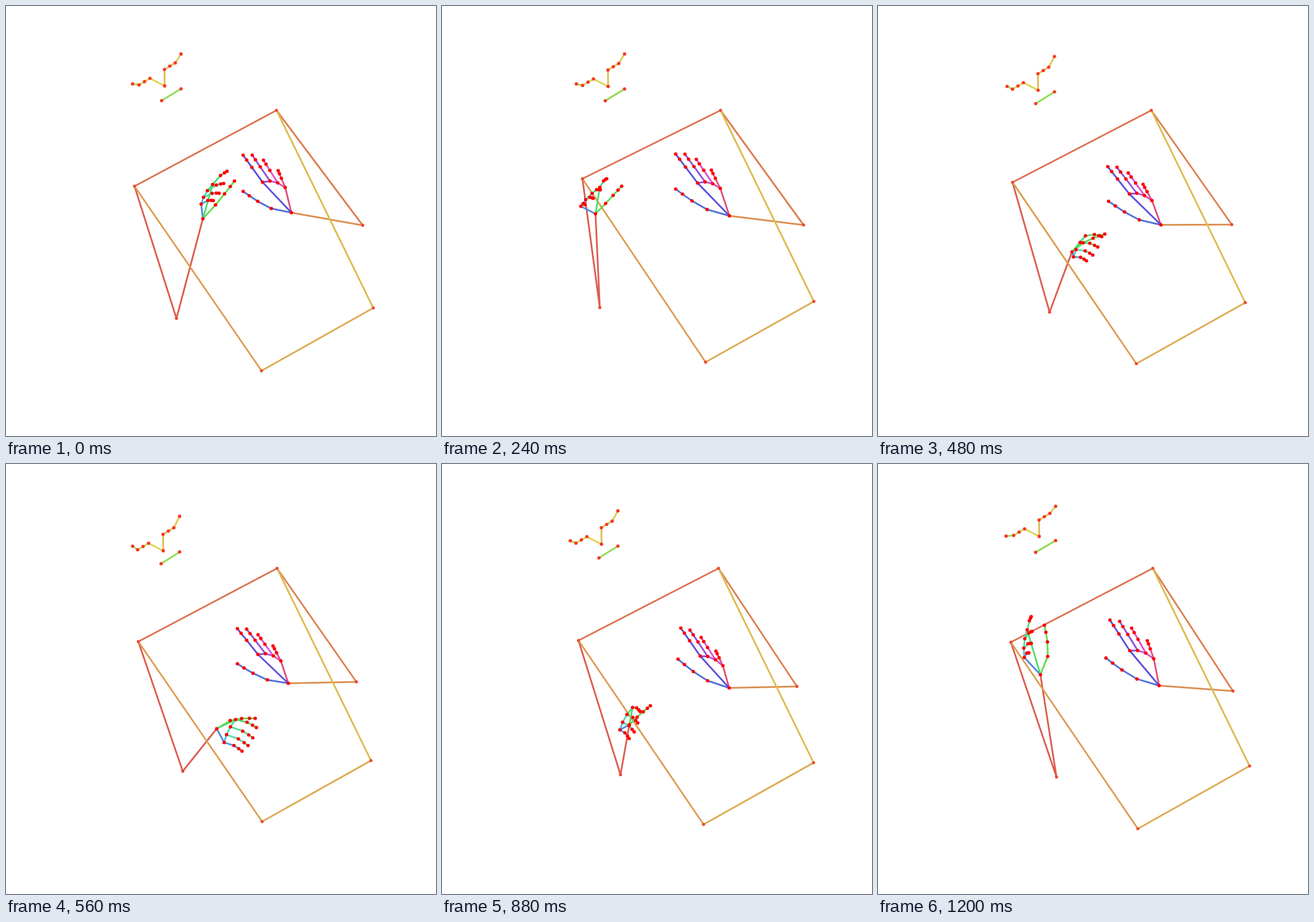
Recreate the animation shown at these times as an HTML page with a canvas. Size 748 px wide and 748 px high, loop 1280 ms.

```html
<!DOCTYPE html>
<html>
<head>
<meta charset="utf-8">
<style>
html, body { margin: 0; width: 100%; height: 100%; overflow: hidden; background: #fff; }
canvas { display: block; }
</style>
</head>
<body>
<canvas id="stage" width="748" height="748"></canvas>
<script>
const ctx = document.getElementById('stage').getContext('2d');
const STEP = 80, STEPS = 16;
const KEYS = [0, 3, 5, 7, 9, 11, 15]; // steps of the key poses

// Key poses of the leading joints; all other points follow from them.
const torso = { // hip x, hip y, shoulder y
  x: [444, 458, 454, 445, 450, 454.5, 451.5],
  y: [634, 619, 621, 621.5, 615.5, 626.5, 634],
  top: [313, 300, 303, 308.5, 304, 306.5, 309.5] };
const head = { // nose, and pitch as the height of the near ear
  x: [275.5, 288.5, 284, 273, 277, 277, 280],
  y: [138.5, 139.5, 141.5, 150.5, 151.5, 139, 125.5],
  pitch: [-3.5, -4.5, -5.5, -8, -8.5, -6, -0.5] };
const left = {
  elbow: { x: [296, 274, 287, 307, 304.5, 310, 310], y: [543, 524, 528.5, 534, 528, 540, 544] },
  wrist: { x: [342, 266.5, 301, 366, 345, 325.5, 282], y: [369.5, 361, 392, 460, 473, 453, 366] },
  thumb: { x: [397, 312, 348, 433, 413, 362, 289], y: [304, 313, 350, 442, 476, 420, 280] },
  index: { x: [384, 286, 333, 435, 407, 344, 266], y: [287, 300, 344, 458, 505, 430, 265] },
  pinky: { x: [360, 248, 303, 410, 376, 325, 262], y: [338, 345, 387, 499, 544, 477, 328] },
  indexBase: { x: [359, 274, 314, 399, 376, 331, 259], y: [310, 315, 353, 444, 472, 423, 288] },
  pinkyBase: { x: [339, 241, 290, 379, 346, 309, 254], y: [344, 348, 387, 484, 514, 462, 336] } };
const right = {
  elbow: { x: [620, 628.5, 622, 609, 612, 617, 617], y: [381, 380.5, 381, 378.5, 379, 386.5, 394.5] },
  wrist: { x: [496, 499.5, 494.5, 490.5, 498, 499, 488.5], y: [359, 364.5, 378.5, 381, 387, 389, 385] },
  thumb: { x: [412, 406, 401, 402, 412, 410, 396], y: [322, 318, 331, 347, 357, 339, 337] },
  index: { x: [412, 406, 399, 402, 415, 415, 403], y: [259, 257, 272, 286, 300, 285, 271] },
  pinky: { x: [473, 468, 460, 464, 478, 476, 468], y: [286, 285, 303, 316, 329, 325, 307] } };

// Smooth curve through the key values
function curve(keys, step) {
  const last = KEYS.length - 1;
  let i = 0;
  while (i < last - 1 && step >= KEYS[i + 1]) i++;
  const span = KEYS[i + 1] - KEYS[i], u = (step - KEYS[i]) / span;
  const slope = k => {
    const a = Math.max(k - 1, 0), b = Math.min(k + 1, last);
    return (keys[b] - keys[a]) / (KEYS[b] - KEYS[a]) * span;
  };
  return keys[i] + (keys[i + 1] - keys[i]) * u * u * (3 - 2 * u)
    + slope(i) * u * (1 - u) * (1 - u) - slope(i + 1) * u * u * (1 - u);
}
const at = (joint, step) => [curve(joint.x, step), curve(joint.y, step)];
const shift = ([x, y], dx, dy) => [x + dx, y + dy];
const mix = ([ax, ay], [bx, by], u) => [ax + (bx - ax) * u, ay + (by - ay) * u];
const bump = (step, mid) => Math.max(0, 1 - Math.abs(step - mid) / 1.5);

let dots;
function line(hue, ...points) {
  ctx.strokeStyle = `hsl(${hue}, 67%, 59%)`;
  ctx.beginPath();
  points.forEach(p => ctx.lineTo(...p));
  ctx.stroke();
}
function mark(color, radius, points) {
  points.forEach(p => dots.push([color, radius, p]));
}

function drawBody(step) {
  const hip = at(torso, step), grow = hip[1] - 623;
  const hip2 = shift(hip, 190 + 0.4 * grow, -106.5 - 0.25 * grow);
  const shoulder = [hip[0] - 216 - 0.45 * grow, curve(torso.top, step)];
  const shoulder2 = [hip[0] + 26, 181];
  const elbow = at(left.elbow, step), elbow2 = at(right.elbow, step);
  line(6, shoulder, elbow, at(left.wrist, step));
  line(14, shoulder, shoulder2);
  line(20, shoulder2, elbow2);
  line(27, elbow2, at(right.wrist, step));
  line(33, shoulder, hip);
  line(39, hip, hip2);
  line(46, shoulder2, hip2);
  mark('#ee4a33', 2.7, [shoulder, shoulder2, elbow, elbow2, hip, hip2]);
}

function drawHead(step) {
  const nose = shift(at(head, step), 0, -11 * bump(step, 1.5));
  const p = curve(head.pitch, step);
  const off = (dx, dy) => shift(nose, dx, dy);
  const ear = off(-58 - 0.6 * p, p), ear2 = off(28.5, p - 52);
  const eye = [-44.5, -35, -25.5].map((dx, i) => off(dx, -1.8 - 5.7 * i));
  const eye2 = [-0.3, 9, 18.5].map((dx, i) => off(dx, -28.7 - 5.7 * i));
  const mouth = [off(-6.5 - 0.35 * p, 28 + 0.7 * p), off(28.5, 7.5 + 0.7 * p)];
  line(85, ear, eye[0]);
  line(70, ...eye);
  line(57, eye[2], nose);
  line(46, nose, eye2[0]);
  line(49, ...eye2);
  line(52, eye2[2], ear2);
  line(93, ...mouth);
  mark('#fa3524', 2.9, [nose, ear, ear2, ...eye, ...eye2, ...mouth]);
}

// Four values running from a to b, the middle two pushed off the straight line
const fan = (a, b, u, v, dx, dy) =>
  [a, shift(mix(a, b, u), dx, dy), shift(mix(a, b, v), dx, dy), b];

function thumbOf(wrist, tip, bulge) {
  const dx = tip[0] - wrist[0], dy = tip[1] - wrist[1], len = Math.hypot(dx, dy);
  const push = bulge(dx, dy) / len;
  const joint = (u, k) => shift(mix(wrist, tip, u), dy * push * k, -dx * push * k);
  return [joint(0.38, 1), joint(0.67, 0.75), joint(0.86, 0.35), tip];
}

function drawHand(wrist, thumb, bases, tips, lift, hues, palm) {
  const fingers = bases.map((base, i) => [
    base,
    shift(mix(base, tips[i], 0.55), 0, -lift),
    shift(mix(base, tips[i], 0.82), 0, -lift / 2),
    tips[i]]);
  palm.forEach((hue, i) => line(hue, bases[i], bases[i + 1] || wrist));
  line(hues[0], wrist, ...thumb);
  line(hues[1], wrist, bases[0]);
  fingers.forEach((f, i) => line(hues[i + 1], ...f));
  mark('#f00', 3, [wrist, ...thumb, ...fingers.flat()]);
}

function drawLeftHand(step) {
  const get = name => at(left[name], step), wrist = get('wrist');
  const thumb = thumbOf(wrist, get('thumb'), (dx, dy) => 11 * (dx + dy) / Math.hypot(dx, dy));
  const bases = fan(get('indexBase'), get('pinkyBase'), 0.33, 0.67, -2.5, -0.5);
  const tips = fan(get('index'), get('pinky'), 0.37, 0.7, 3, 2.5);
  drawHand(wrist, thumb, bases, tips, 3, [112, 134, 148, 158, 207], [144, 160, 195, 216]);
}

function drawRightHand(step) {
  const get = name => at(right[name], step), wrist = get('wrist');
  const index = get('index'), pinky = get('pinky');
  const thumb = thumbOf(wrist, get('thumb'), () => 7.5);
  const bases = fan(shift(mix(wrist, index, 0.55), -4, 2),
    shift(mix(wrist, pinky, 0.6), 3, 0), 0.33, 0.67, 0, -5);
  const tips = fan(index, pinky, 0.26, 0.58, 0, -7);
  drawHand(wrist, thumb, bases, tips, 0, [226, 244, 270, 303, 335], [262, 290, 318, 343]);
}

function draw(now) {
  const step = Math.floor(now / STEP) % STEPS;
  dots = [];
  ctx.setTransform(1, 0, 0, 1, 0, 0);
  ctx.fillStyle = '#fff';
  ctx.fillRect(0, 0, 748, 748);
  ctx.translate(0.5 + 12 * bump(step, 12.5), 0.5);
  ctx.lineWidth = 3;
  ctx.lineCap = ctx.lineJoin = 'round';
  drawBody(step);
  drawHead(step);
  drawLeftHand(step);
  drawRightHand(step);
  for (const [color, radius, [x, y]] of dots) {
    ctx.fillStyle = color;
    ctx.beginPath();
    ctx.arc(x, y, radius, 0, 7);
    ctx.fill();
  }
}

const start = performance.now();
function tick() {
  draw(performance.now() - start);
  requestAnimationFrame(tick);
}
tick();
</script>
</body>
</html>
```
